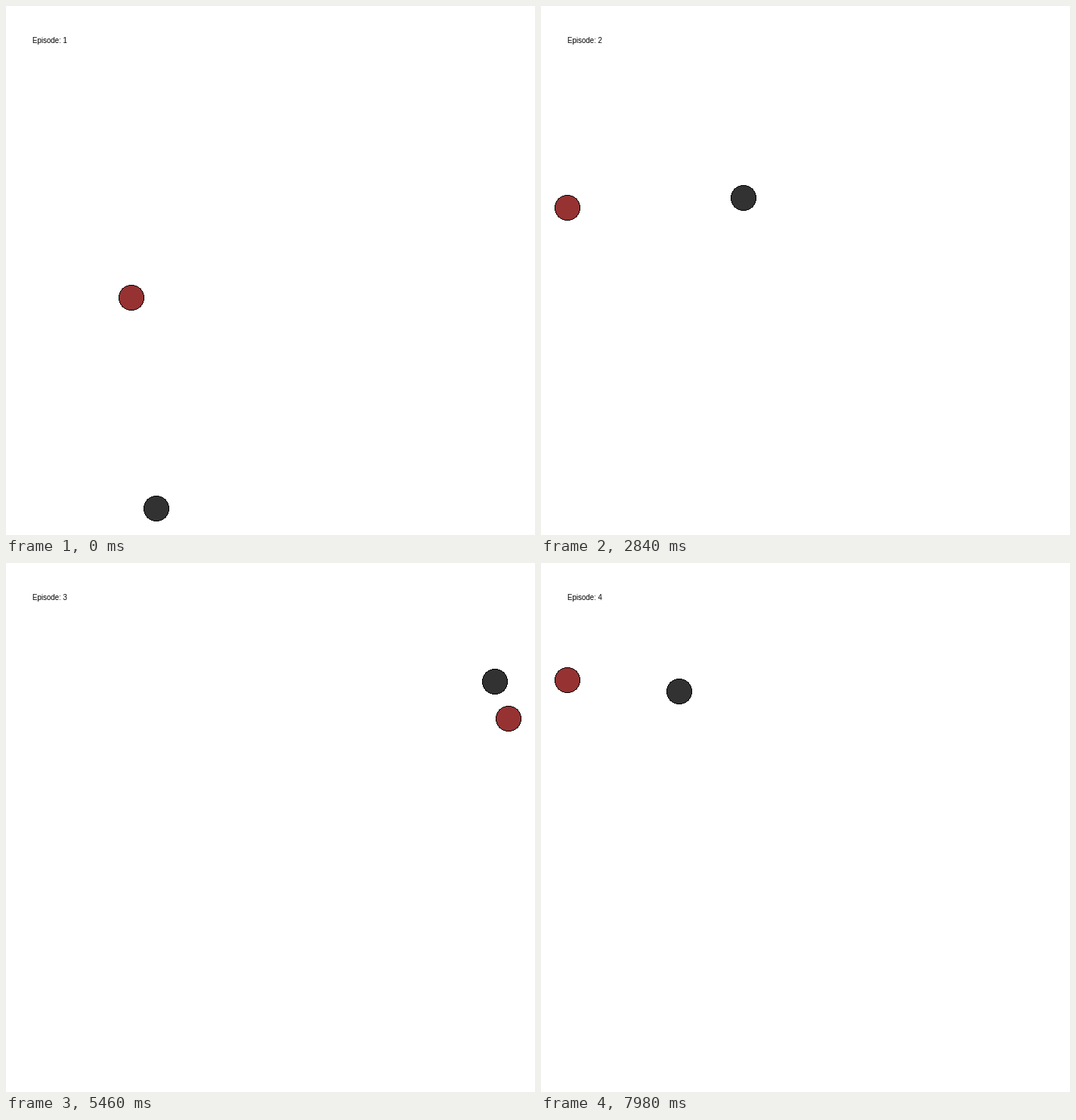
Recreate the animation shown at these times as a matplotlib script. Size 700 by 700 pixels, loop 8 s.

```python
import numpy as np
import matplotlib.pyplot as plt
from matplotlib.animation import FuncAnimation

SIZE = 700
DPI = 100
TICK = 20          # ms per animation frame
LOOP = 8000
EPISODE = 2320     # ms: a 20 ms opening frame, then 23 steps of 100 ms
STEPS = 24
DRAG = 0.75        # share of the speed kept on every step
RADIUS = 17

# Per episode: the fixed landmark, then the agent's key points (step, x, y).
EPISODES = [
    ((34.1, 413), [(0, 92, 890), (9, 359, 447), (13, 381, 333), (18, 379, 293)]),
    ((34.1, 267), [(0, 526, 365), (6, 268, 254), (12, 153, 203), (21, 188, 193)]),
    ((664.1, 206), [(0, 440, 262), (9, 647, 157), (15, 727, 100)]),
    ((34.1, 155), [(0, 127, 482), (6, 208, 283), (9, 193, 197), (11, 183, 170)]),
]


def to_world(p):
    return (np.asarray(p, float) - 349.1) / 315


def to_pixel(u, cam):
    return np.floor(350 + 0.9 * np.floor(350 * (u / cam)))


def glide(points):
    """Damped motion from rest through the key points with the least force."""
    points = np.array(points, float)
    steps, start = points[1:, 0].astype(int), points[0, 1:]
    lag = np.maximum(np.subtract.outer(np.arange(STEPS), np.arange(STEPS - 1)), 0)
    response = (1 - DRAG ** lag) / (1 - DRAG)
    force = np.linalg.lstsq(response[steps], points[1:, 1:] - start, rcond=None)[0]
    return start + response @ force


def disc(gray_or_red, z):
    """A hard-edged disc with a one-pixel black rim."""
    axis = np.arange(-RADIUS, RADIUS) + 0.5
    full = np.hypot(*np.meshgrid(axis, axis)) <= RADIUS
    pad = np.pad(full, 1)
    inner = pad[:-2, 1:-1] & pad[2:, 1:-1] & pad[1:-1, :-2] & pad[1:-1, 2:]
    pixels = np.zeros(full.shape + (4,), np.uint8)
    pixels[full, 3] = 255
    pixels[inner, :3] = gray_or_red
    return fig.figimage(pixels, 0, 0, origin="upper", zorder=z)


def place(image, center):
    image.ox = int(center[0]) - RADIUS
    image.oy = SIZE - int(center[1]) - RADIUS


fig = plt.figure(figsize=(SIZE / DPI, SIZE / DPI), dpi=DPI, facecolor="white")
agent = disc((50, 50, 50), 2)
landmark = disc((150, 50, 50), 3)
label = fig.text(35 / SIZE, 1 - 49 / SIZE, "", family="Liberation Sans",
                 fontsize=7, color="black", va="baseline", ha="left")

marks = [to_world(mark) for mark, _ in EPISODES]
paths = [to_world(glide(points)) for _, points in EPISODES]


def update(i):
    episode, t = divmod(i * TICK, EPISODE)
    step = 0 if t < 20 else 1 + (t - 20) // 100
    pos, mark = paths[episode][step], marks[episode]
    # The camera zooms so the farthest body sits on the margin.
    cam = max(np.abs(pos).max(), np.abs(mark).max())
    place(agent, to_pixel(pos, cam))
    place(landmark, to_pixel(mark, cam))
    label.set_text(f"Episode: {episode + 1}")
    return agent, landmark, label


anim = FuncAnimation(fig, update, frames=LOOP // TICK, interval=TICK,
                     repeat=True, repeat_delay=0, blit=False)
plt.show()
```
